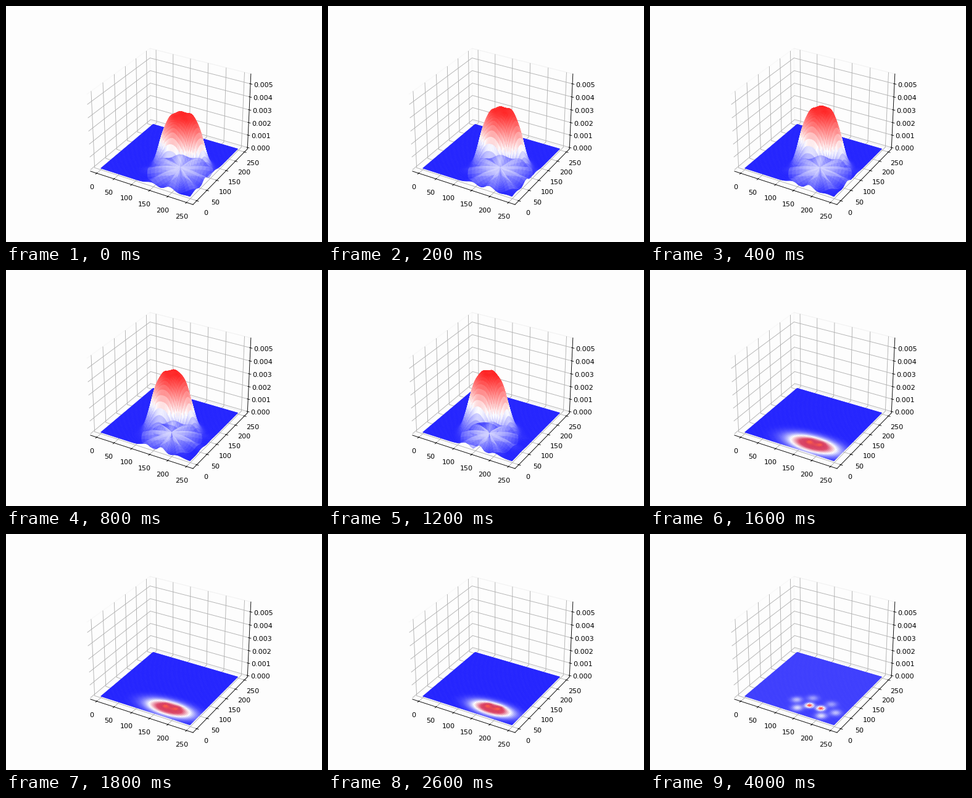
Write a matplotlib script that moves like this. It is 512 px wide and 384 px high and loops after 5.8 s.

```python
import numpy as np
import matplotlib.pyplot as plt
from matplotlib import colormaps
from matplotlib.animation import FuncAnimation
from matplotlib.colors import LinearSegmentedColormap

SIDE = 249
Z_MAX = 0.00563
PAPER = "#fdfdfd"
STEP_MS = 200
FRAMES = 29
COLLAPSE, SETTLED, SPLIT = 8, 13, 20
SPOTS = [(156, 41), (186, 43)]

plt.rcParams["font.family"] = "DejaVu Sans"
fig = plt.figure(figsize=(6.4, 4.8), dpi=80, facecolor=PAPER)
ax = fig.add_subplot(projection="3d", facecolor=PAPER, computed_zorder=False)

X, Y = np.meshgrid(np.linspace(0, SIDE, 61), np.linspace(0, SIDE, 61))
RHO, THETA = np.meshgrid(np.linspace(0, 1, 10), np.linspace(0, 2 * np.pi, 57))
bwr = colormaps["bwr"]
glow = LinearSegmentedColormap.from_list("glow", [
    (0, "#0000ff"), (.3, "#ffffff"), (.58, "#d62850"),
    (.8, "#d01c44"), (1, "#ff4028")])


def setup_axes():
    margin = SIDE * (1.1 * 25 / 24 - 1) / 2
    ax.set_xlim(-margin, SIDE + margin)
    ax.set_ylim(-margin, SIDE + margin)
    ax.set_zlim(-Z_MAX / 48, Z_MAX * 49 / 48)
    ax.set_xticks(range(0, 251, 50))
    ax.set_yticks(range(0, 251, 50))
    ax.set_zticks(np.arange(6) / 1000)
    # ticks just past the data must not widen the limits
    for axis in (ax.xaxis, ax.yaxis, ax.zaxis):
        axis.pane.fill = False


def add_sheet(x, y, z, colors, zorder, linewidth=0.0):
    ax.plot_surface(x, y, z, facecolors=colors, shade=False, rstride=1,
                    cstride=1, linewidth=linewidth, zorder=zorder)


def add_floor(z, values, cmap, opacity):
    """Opaque sheet in colours already mixed with the paper."""
    colors = cmap(np.clip(values, 0, 1))
    colors[..., :3] = colors[..., :3] * opacity + .99 * (1 - opacity)
    add_sheet(X, Y, z, colors, zorder=1, linewidth=.6)


def add_disc(cx, cy, radius, height, values, alpha, zorder):
    """Translucent round sheet, cut off at the edges of the domain."""
    x = np.clip(cx + radius * RHO * np.cos(THETA), 0, SIDE)
    y = np.clip(cy + radius * RHO * np.sin(THETA), 0, SIDE)
    add_sheet(x, y, height(x, y), bwr(values, alpha=alpha), zorder)


def blob(x, y, radius):
    return np.exp(-((X - x) ** 2 + (Y - y) ** 2) / radius ** 2)


def draw_peak(step):
    u = step / (COLLAPSE - 1)
    cx, cy = 174 - 37 * u, 93 - 23 * u
    height = .0047 - .0005 * .2 ** step
    hill = np.exp(-(np.hypot(X - cx, Y - cy) / (58 - 5 * u)) ** (4 - .7 * u))
    hill *= 1 + .015 * np.cos(X / 5 + step) * np.cos(Y / 6)

    veil_x, veil_y, veil_r = cx + 8 + 8 * u, cy - 20, 80 - 12 * u

    def folds(x, y):
        dx, dy = x - veil_x, y - veil_y
        lobes = .5 + .5 * np.cos(9 * np.arctan2(dy, dx) + u)
        return .0006 * lobes * np.exp(-(np.hypot(dx, dy) / veil_r) ** 4)

    z = np.maximum(height * hill, folds(X, Y))
    add_floor(z, z / z.max(), bwr, .855)

    dome_r = 36 * np.clip((u - .35) / .25, 0, 1)
    if dome_r > 0:
        add_disc(cx - 18, 83, dome_r, lambda x, y: 0 * x,
                 .08 + 0 * RHO, .85, zorder=2)
    shade = .38 - .22 * RHO ** 2 + .06 * np.cos(9 * THETA + u)
    add_disc(veil_x, veil_y, veil_r, folds, shade, .6, zorder=3)


def collapsed(step):
    """Wide glow that shrinks around two hot spots."""
    age = min(step, SETTLED) - COLLAPSE
    width = 1 + .25 * .5 ** age
    e = ((X - 170 - .5 * age) / 35) ** 2 + ((Y - 34) / 17) ** 2
    field = .85 * np.exp(-.55 * e / width ** 2)
    return field + sum((.25 + .01 * age) * blob(x, y, 9) for x, y in SPOTS)


def split():
    """Two hot spots with a ring of pale patches around them."""
    field = sum(blob(x, y, 10) for x, y in SPOTS)
    for angle in np.radians(-55 + 57 * np.arange(6)):
        x, y = 171 + 55 * np.cos(angle), 43 + 33 * np.sin(angle)
        field = field + (.34 - .1 * np.sin(angle)) * blob(x, y, 13)
    return field


def draw(step):
    for old in list(ax.collections):
        old.remove()
    if step < COLLAPSE:
        draw_peak(step)
    elif step < SPLIT:
        add_floor(0 * X, collapsed(step), glow, .855)
    else:
        add_floor(0 * X, split(), bwr, .75)
    return list(ax.collections)


setup_axes()
anim = FuncAnimation(fig, draw, frames=FRAMES, interval=STEP_MS,
                     init_func=lambda: draw(0), repeat=True, repeat_delay=0)
plt.show()
```
